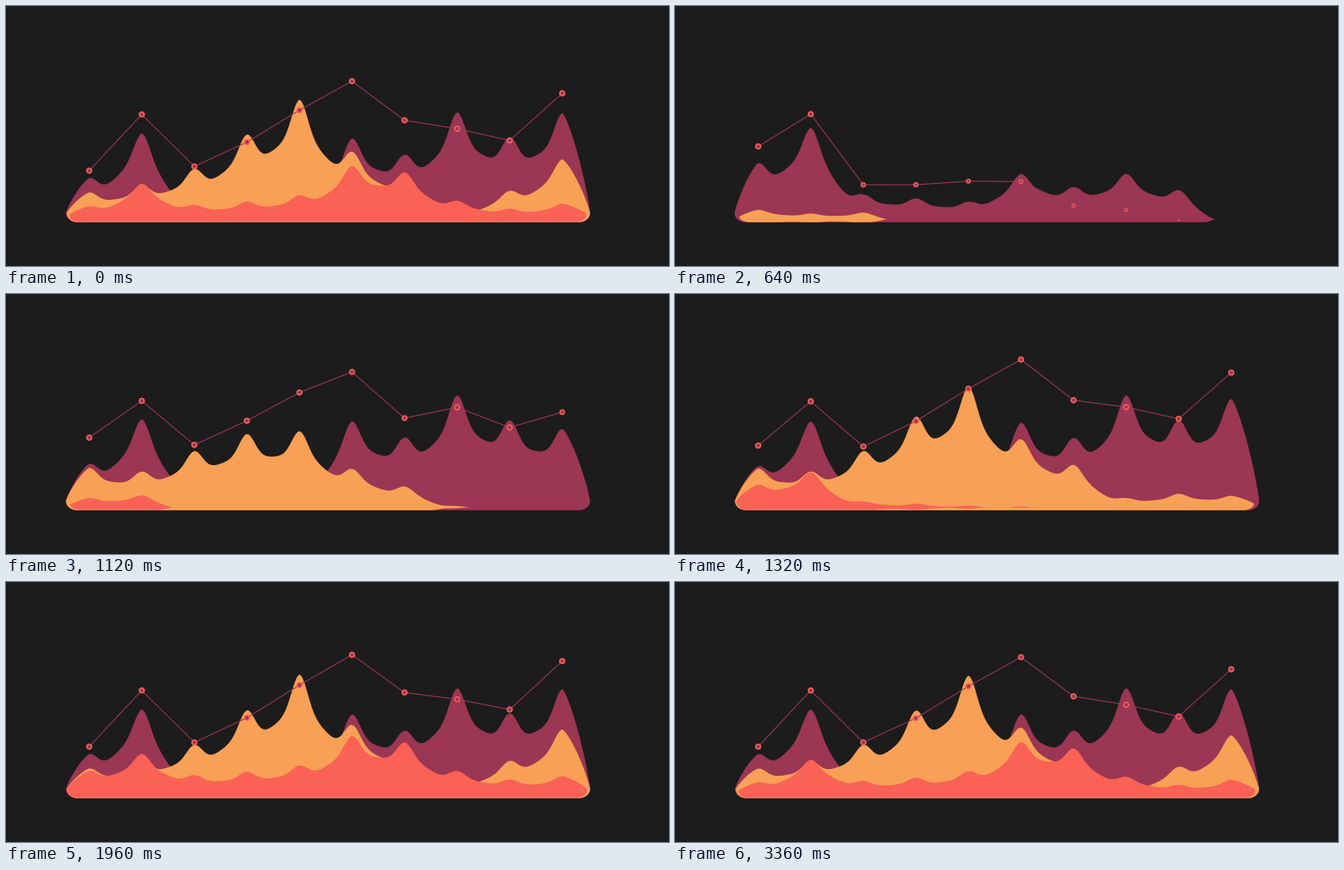
Animation, 789 px wide and 310 px high, one loop 4360 ms. Source, as a matplotlib script:

```python
import numpy as np
import matplotlib.pyplot as plt
from matplotlib.animation import FuncAnimation

W, H, DPI = 789, 310, 100
STEP, FRAMES = 40, 109
BG, PLUM, ORANGE, CORAL = "#1c1c1c", "#9b3654", "#f8a055", "#f96255"
BASE = 257.8          # bottom of the areas
THIN = 3.6            # height below which an area vanishes
I = np.arange(10)
X = 99.2 + 62.55 * I


def keys(points):
    """One value per column, interpolated between a few columns."""
    return np.interp(I, list(points), list(points.values()))


def ease(u):
    return (1 - np.cos(np.pi * np.clip(u, 0, 1))) / 2


class Series:
    """Columns rise one after another past their goal, then settle back."""

    def __init__(self, goal, extra, start, rise, middle, fall):
        self.goal = np.array(goal)
        self.extra = np.interp(I, [0, 1, 2], extra)
        self.start, self.rise = keys(start), keys(rise)
        self.middle, self.fall = keys(middle), fall

    def grown(self, t):
        return ease((t - self.start) / self.rise)

    def at(self, t):
        settled = ease((t - self.middle) / self.fall + 0.5)
        return (self.goal + self.extra * (1 - settled)) * self.grown(t)


plum = Series([52.5, 106, 27, 25, 28, 100, 80.5, 131, 101, 130],
              extra=(18, 6.5, 6),
              start={1: 0, 4: 170, 8: 320, 9: 627},
              rise={0: 440, 1: 470, 5: 820, 9: 770},
              middle={0: 1000, 9: 1720}, fall=500)
orange = Series([35.5, 44, 63.5, 104.5, 146, 84, 54, 14, 37.5, 75],
                extra=(15, 2, 7),
                start={0: 400, 2: 465, 3: 647, 4: 741, 6: 805, 9: 1120},
                rise={0: 660},
                middle={0: 1500, 9: 2310}, fall=500)
coral = Series([19, 46, 20.5, 24.5, 32, 67, 59.5, 25.5, 16, 22],
               extra=(14, 7, 7),
               start={0: 860, 1: 900, 2: 1050, 9: 1440},
               rise={1: 560, 2: 650},
               middle={0: 2100, 5: 2400, 6: 2650, 9: 3025}, fall=350)
trend = Series([60, 127, 65, 94, 132, 166.7, 120, 110, 96, 152.2],
               extra=(30, 2, 11.5),
               start={1: 0, 2: 205, 5: 290, 9: 714},
               rise={1: 690, 3: 920, 5: 1020, 6: 1000, 7: 640},
               middle={0: 1330, 9: 2185}, fall=900)

# Falloff from one peak to the next, and from the outer peaks to the ends
U = np.linspace(0, 1, 40)
PEAK = (0.69 * (1 - U + 0.55 * np.sin(2 * np.pi * U) / (2 * np.pi))
        + 0.31 * np.exp(-(U / 0.21) ** 2))
SAG = 0.1 * np.sin(np.pi * U) ** 2
V = 1 - (1 - U) ** 2
FLANK = (1 - V ** 1.3) ** 0.85


def flank(h, width):
    """Offsets, tops and bottoms from an outer peak to the rounded end."""
    end = min(11, 0.45 * h)
    q = np.clip(1 - width * (1 - V) / 13, 0, 1)
    return width * V, end + (h - end) * FLANK, end * (1 - np.sqrt(1 - q * q))


def outline(h):
    left, ltop, lbot = flank(h[0], 28.5 - 15 * np.exp(-h[0] / 16))
    right, rtop, rbot = flank(h[-1], 33 - 17 * np.exp(-h[-1] / 17))
    mid = (X[:-1, None] + np.diff(X)[:, None] * U).ravel()
    a, b = h[:-1, None], h[1:, None]
    top = a * PEAK + b * PEAK[::-1] - SAG * (a - b) ** 2 / (a + b + 1e-9)
    x = np.r_[X[0] - left[::-1], mid, X[-1] + right]
    top = np.r_[ltop[::-1], top.ravel(), rtop]
    low = np.r_[lbot[::-1], np.zeros(len(mid)), rbot]
    low = np.maximum(low, THIN * np.clip(1 - (top - THIN) / 6, 0, 1) ** 1.6)
    top = np.maximum(top, THIN)
    return np.c_[np.r_[x, x[::-1]], BASE - np.r_[top, low[::-1]]]


fig = plt.figure(figsize=(W / DPI, H / DPI), dpi=DPI, facecolor=BG)
ax = fig.add_axes([0, 0, 1, 1])
ax.set_xlim(0, W)
ax.set_ylim(H, 0)
ax.axis("off")

px = 72 / DPI
layers = []
for series, color in ((plum, PLUM), (orange, ORANGE), (coral, CORAL)):
    patch, = ax.fill([0, 0, 0], [0, 0, 0], color=color, lw=0)
    layers.append((series, patch))
lines = [ax.plot([], [], color=PLUM, lw=1.1 * px)[0] for _ in X[1:]]
dots = ax.scatter(X, X, s=1, facecolor=PLUM, edgecolor=CORAL,
                  linewidth=1.6 * px, zorder=5)


def draw(frame):
    t = (frame or FRAMES) * STEP
    for series, patch in layers:
        patch.set_xy(outline(series.at(t)))
    x, y = X - 0.2, 256.3 - trend.at(t)
    grown = trend.grown(t)
    for i, line in enumerate(lines):
        line.set_data(x[i:i + 2], y[i:i + 2])
        line.set_alpha(min(1, 8 * grown[i + 1]))
    size = grown ** 0.2
    dots.set_offsets(np.c_[x, y])
    dots.set_sizes((5.8 * px * size) ** 2)
    dots.set_linewidths(1.6 * px * size)
    return [p for _, p in layers] + lines + [dots]


anim = FuncAnimation(fig, draw, frames=FRAMES, interval=STEP,
                     init_func=lambda: draw(0), repeat=True, repeat_delay=0)
plt.show()
```
